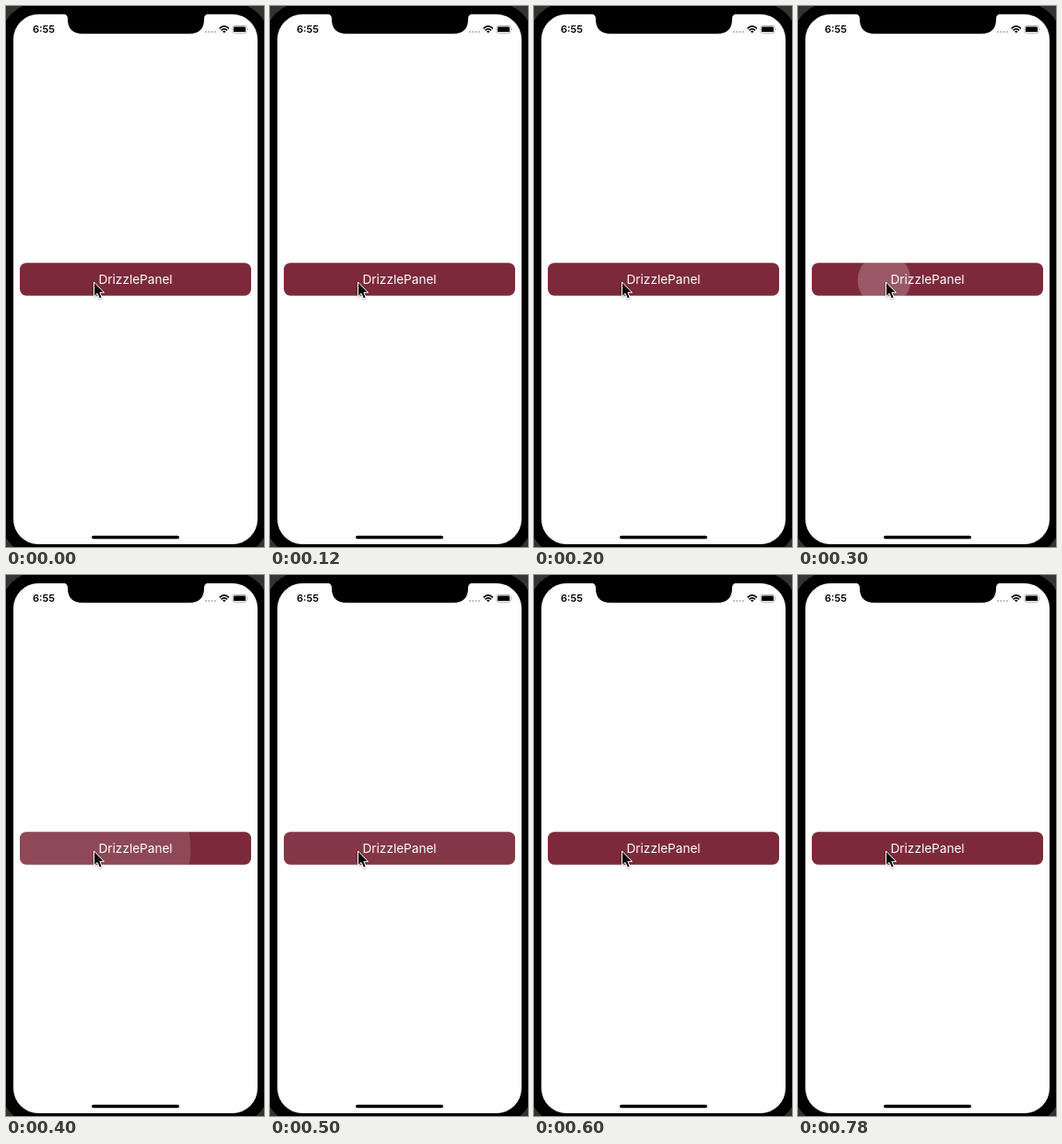
Write an HTML page that moves like this. It is 280 by 586 pixels and loops after 900 ms.

```html
<!DOCTYPE html>
<html lang="en">
<head>
<meta charset="utf-8">
<title>Button ripple</title>
<style>
  html, body { margin: 0; height: 100%; overflow: hidden; background: #000; }
  svg { display: block; width: 100vw; height: 100vh; }
  text { font-family: Inter, Roboto, sans-serif; }
</style>
</head>
<body>
<svg viewBox="0 0 280 586">
  <defs>
    <clipPath id="shape"><rect x="15" y="278.3" width="251" height="35.4" rx="7"/></clipPath>
    <filter id="shadow" x="-50%" y="-50%" width="200%" height="200%">
      <feDropShadow dx="0" dy="1" stdDeviation="0.8" flood-opacity="0.35"/>
    </filter>
  </defs>

  <!-- phone -->
  <rect width="280" height="586" fill="#333"/>
  <rect x="-5" y="-3" width="290" height="598" rx="38"/>
  <rect x="8" y="9" width="265" height="574" rx="27" fill="#fff"/>
  <path d="M62 8.5Q67 9 67 14Q67 30 83 30H199Q215 30 215 14Q215 9 220 8.5Z"/>
  <rect x="93" y="573.8" width="95" height="3.5" rx="1.75"/>

  <!-- status bar -->
  <text x="29" y="29" font-size="11" font-weight="600" textLength="">6:55</text>
  <path d="M216 28H228" stroke="#aaa" stroke-width="1.4" stroke-dasharray="2 1.3"/>
  <g fill="none" stroke="#000" stroke-width="1.7">
    <path d="M231.7 24.3Q236.8 19.6 241.9 24.3"/>
    <path d="M233.5 26.3Q236.8 23.4 240.1 26.3"/>
  </g>
  <path d="M235 27.5Q236.8 26.1 238.6 27.5L236.8 29.3Z"/>
  <rect x="245.9" y="21.4" width="15.2" height="7.8" rx="2.2" fill="none" stroke="#999" stroke-width=".8"/>
  <rect x="247" y="22.5" width="13" height="5.6" rx="1.2"/>
  <path d="M262 24Q263.2 25.3 262 26.6Z" fill="#999"/>

  <!-- button -->
  <g clip-path="url(#shape)">
    <rect x="15" y="278" width="251" height="36" fill="#7c2a3a"/>
    <circle id="ripple" cx="93.5" cy="297" r="0" fill="#fff"/>
  </g>
  <text x="140.6" y="301" font-size="13.6" fill="#fff" text-anchor="middle">DrizzlePanel</text>

  <!-- pointer -->
  <path d="M95.5 299V314.7L99.1 311.4L101.6 317L104.2 315.9L101.8 310.4H106.5Z"
        stroke="#fff" stroke-width="1" stroke-linejoin="round" filter="url(#shadow)"/>
</svg>
<script>
const LOOP = 900, TICK = 100, START = 263;
const ripple = document.getElementById('ripple');
const start = performance.now();

function draw(now) {
  // The motion advances in ticks of a tenth of a second.
  const t = Math.floor(Math.max(0, now - start) % LOOP / TICK) * TICK;
  const age = Math.max(0, t - START);
  ripple.setAttribute('r', age * 0.78);
  ripple.setAttribute('opacity', Math.max(0, 0.25 - age * 0.0008));
  requestAnimationFrame(draw);
}
draw(start);
</script>
</body>
</html>
```
